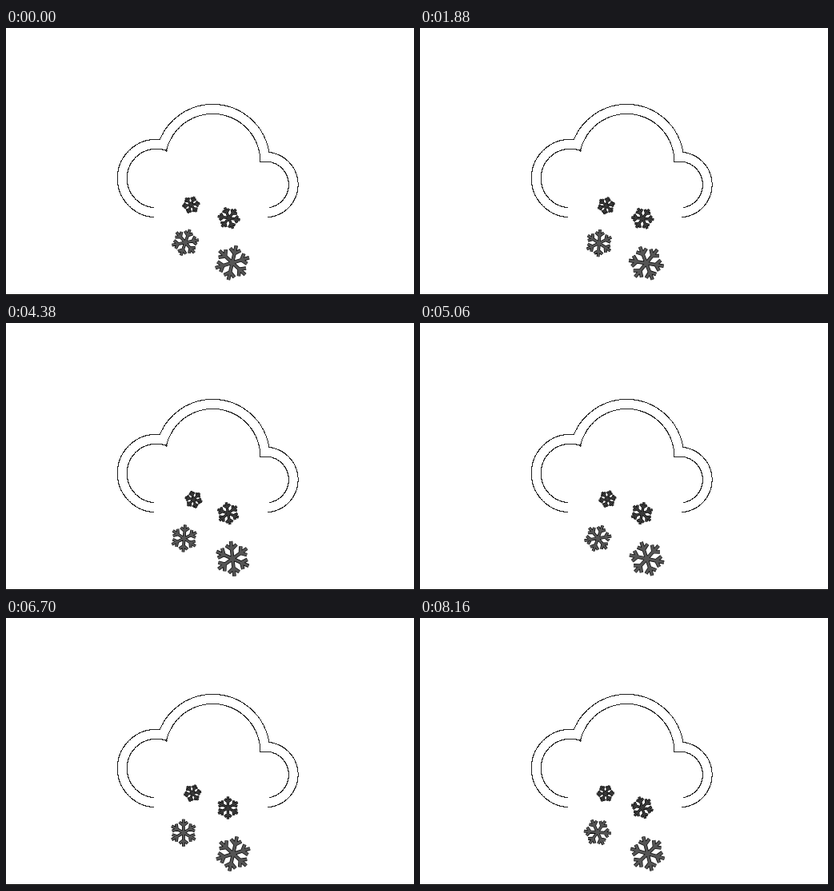
Animation, 510 px wide and 334 px high, one loop 8.22 s. Source, as an HTML page with a canvas:

```html
<!DOCTYPE html>
<html lang="en">
<head>
<meta charset="utf-8">
<title>Snow cloud</title>
<style>
  html, body { margin: 0; width: 100%; height: 100%; overflow: hidden; background: #fff; }
  canvas { display: block; }
</style>
</head>
<body>
<canvas id="stage" width="510" height="334"></canvas>
<script>
const ctx = document.getElementById('stage').getContext('2d');
const LOOP = 8220;
const rad = deg => deg * Math.PI / 180;

// Each arc: centre x, centre y, radius, start and end in degrees
const cloud = [
  [188, 188, 48.8, 94, 275], [258.4, 166.8, 71.4, 202.6, 350.7], [324.3, 196, 40.8, 275.6, 446],
  [188, 188, 36.8, 95, 291], [258.4, 166.8, 59.4, 192.1, 360], [324.3, 196, 29, 256, 440]
];

// Each flake orbits slightly around its pivot as it turns; speed in degrees per second
const flakes = [
  { x: 232.9, y: 220.7, size: 12, orbit: 1.6, phase: 162, speed: -36, turn: 51.6, fill: '#3a3a3a' },
  { x: 278, y: 237.8, size: 15, orbit: 0.6, phase: 0, speed: 30, turn: 9, fill: '#3a3a3a' },
  { x: 223, y: 268.3, size: 18, orbit: 1.2, phase: 0, speed: 24, turn: 49, fill: '#555' },
  { x: 283.8, y: 294, size: 23, orbit: 1, phase: 200, speed: -18, turn: 43, fill: '#555' }
];

// Hard-edged one-pixel arc
function pixelArc([x, y, r, from, to]) {
  for (let d = from; d <= to; d += 0.5) {
    ctx.fillRect(Math.floor(x + r * Math.cos(rad(d))), Math.floor(y + r * Math.sin(rad(d))), 1, 1);
  }
}

function flakePath(size) {
  const path = new Path2D();
  const tip = size - 1;
  for (let i = 0; i < 6; i++) {
    const point = (r, deg) => [r * Math.cos(rad(i * 60 + deg)), r * Math.sin(rad(i * 60 + deg))];
    path.moveTo(0, 0);
    path.lineTo(...point(tip, 0));
    path.moveTo(...point(tip * 0.84, 21));
    path.lineTo(...point(tip * 0.54, 0));
    path.lineTo(...point(tip * 0.84, -21));
  }
  return path;
}

for (const f of flakes) f.path = flakePath(f.size);

function drawFlake(f, sec) {
  const a = rad(f.phase + f.speed * sec);
  ctx.save();
  ctx.translate(f.x + f.orbit * Math.cos(a), f.y + f.orbit * Math.sin(a));
  ctx.rotate(rad(f.turn + f.speed * sec));
  const width = f.size * 0.14;
  ctx.strokeStyle = '#000';
  ctx.lineWidth = width + 1.3;
  ctx.stroke(f.path);
  ctx.strokeStyle = f.fill;
  ctx.lineWidth = width;
  ctx.stroke(f.path);
  ctx.restore();
}

function draw(now) {
  const sec = (now % LOOP) / 1000;
  ctx.fillStyle = '#fff';
  ctx.fillRect(0, 0, 510, 334);
  ctx.fillStyle = '#222';
  cloud.forEach(pixelArc);
  ctx.fillStyle = '#000';
  ctx.fillRect(0, 333, 510, 1);
  for (const f of flakes) drawFlake(f, sec);
  requestAnimationFrame(draw);
}
requestAnimationFrame(draw);
</script>
</body>
</html>
```
